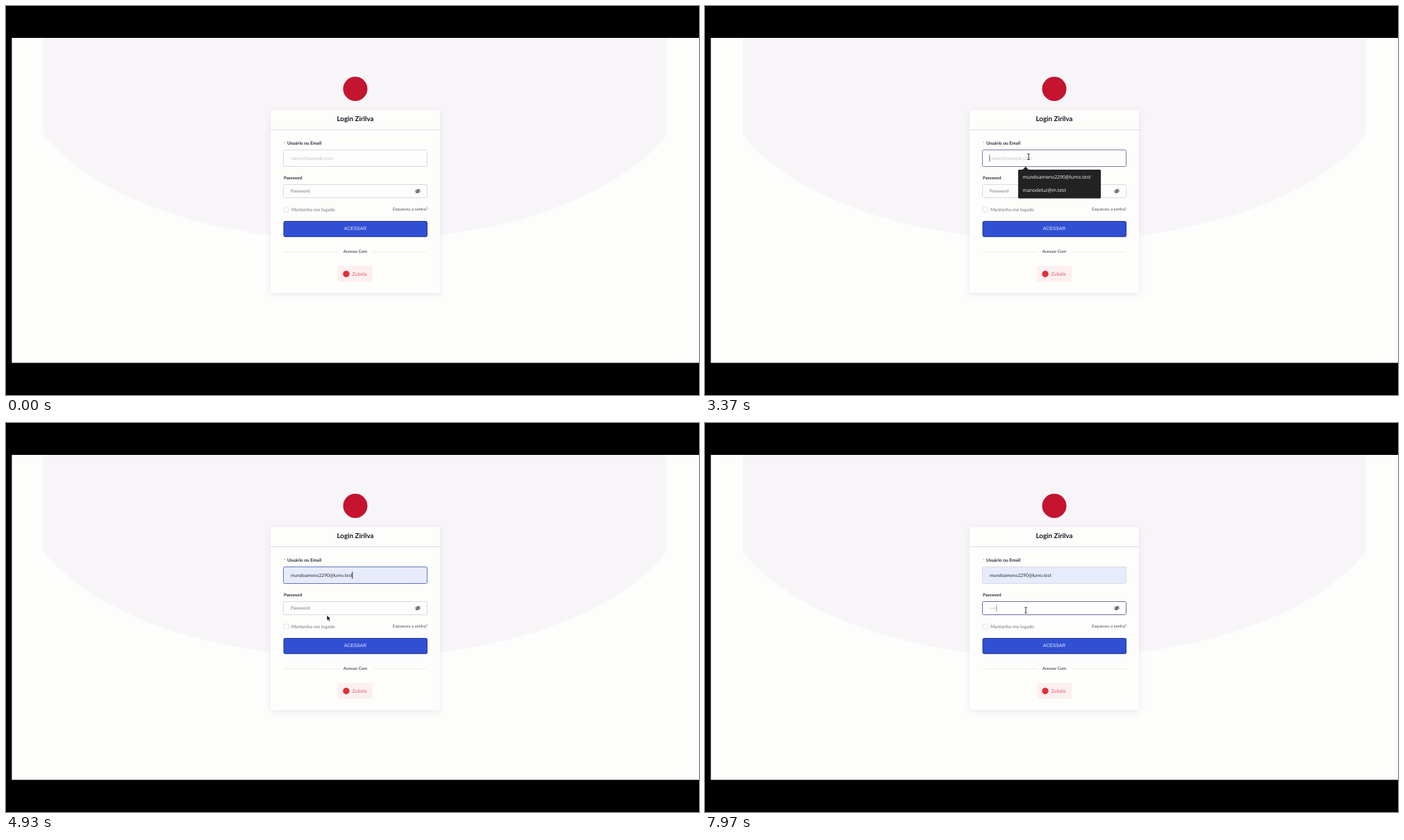
An HTML page for the animation above (8000 ms loop, 998 by 561 pixels).

```html
<!DOCTYPE html>
<html lang="pt">
<head>
<meta charset="utf-8">
<title>Login</title>
<style>
  html, body { margin: 0; width: 100%; height: 100%; overflow: hidden; background: #000; }
  svg { display: block; width: 100vw; height: 100vh; }
  text { font-family: Lato, sans-serif; text-rendering: geometricPrecision; fill: #2b2b38; }
  .bold { font-weight: 700; }
  .mid { text-anchor: middle; }
  .hint { fill: #77777f; }
  .arial { font-family: "Liberation Sans", Arial, sans-serif; }
  .noto { font-family: "Noto Sans", sans-serif; font-size: 6.85px; fill: #ececec; }
  .box { fill: #fdfdfd; stroke: #dadae0; }
  .card { filter: drop-shadow(0 2px 4px rgba(60, 50, 90, .1)); }
</style>
</head>
<body>
<svg viewBox="0 0 998 561">
  <rect width="998" height="561"/>
  <rect x="8.4" y="46" width="990" height="468.6" fill="#fdfdfb"/>
  <path d="M54 46H952V185A480 238 0 0 1 54 185Z" fill="#f8f5f9"/>
  <circle cx="503" cy="119.5" r="17.5" fill="#c4142f"/>

  <rect class="card" x="381" y="150" width="244" height="264" rx="1" fill="#fdfdfc"/>
  <path d="M381 178.5H625" stroke="#dcdce0"/>
  <text class="bold mid" x="503" y="166" font-size="9.8" style="fill:#15151f">Login Zirilva</text>

  <text x="400" y="200.3" font-size="6" style="fill:#c66">*</text>
  <text class="bold" x="405" y="200.2" font-size="6.6">Usuário ou Email</text>
  <rect id="email" class="box" x="399.5" y="207.5" width="207" height="24" rx="2"/>
  <text id="emailHint" x="410" y="222" font-size="6.75" style="fill:#c3c3cc">name@example.com</text>
  <text id="preview" class="arial" x="410" y="221.8" font-size="6.25">mundoameno2290@lumo.test</text>
  <text id="emailText" x="410" y="222" font-size="6.7">mundoameno2290@lumo.test</text>

  <text class="bold" x="400" y="249.8" font-size="6.2">Password</text>
  <rect id="pass" class="box" x="399.5" y="257.5" width="207" height="19" rx="2"/>
  <text id="passHint" class="hint" x="410" y="269.2" font-size="6.5">Password</text>
  <g id="dots" fill="#8a8a92"></g>
  <g fill="none" stroke="#3c3c46" stroke-width=".9">
    <path d="M589.3 267Q593 262.4 596.7 267Q593 271.6 589.3 267ZM590.2 270.2L595.8 263.8"/>
    <circle cx="593" cy="267" r="1.4"/>
  </g>
  <rect id="caret" width="1" height="10" fill="#22222c"/>

  <rect class="box" x="400" y="290" width="7" height="7" rx="1.2" stroke-width=".8"/>
  <text class="hint" x="411" y="295.7" font-size="6.7">Mantenha-me logado</text>
  <text x="557" y="295.2" font-size="6.1" style="fill:#50505c">Esqueceu a senha?</text>

  <rect x="400" y="311" width="207" height="22.6" rx="2" fill="#1b2a78" opacity=".35"/>
  <rect x="400" y="310.5" width="206.5" height="22" rx="2" fill="#304fd2" stroke="#2537a0"/>
  <text class="arial mid" x="503" y="323.4" font-size="6.75" style="fill:#f2f4ff">ACESSAR</text>

  <path d="M400 354.5H479M528 354.5H606" stroke="#f0f0d8"/>
  <text class="mid" x="503" y="356.2" font-size="6.1">Acessar Com</text>
  <rect x="478" y="375" width="50" height="23" rx="2" fill="#fdefef"/>
  <circle cx="490" cy="386.5" r="4.7" fill="#e0303c"/>
  <text x="498.5" y="388.8" font-size="7.1" style="fill:#dc5f70">Zubela</text>

  <g id="menu">
    <path d="M456.5 237L461.7 231.8L467 237Z" fill="#222"/>
    <rect x="451" y="236" width="119" height="41.5" rx="1.5" fill="#222"/>
    <rect id="hover" x="452" y="237" width="117" height="20" fill="#393939"/>
    <text class="noto" x="457.5" y="249">mundoameno2290@lumo.test</text>
    <text class="noto" x="457.5" y="268">manodeluz@m.test</text>
  </g>

  <g id="pointer">
    <path id="arrow" d="M0 0V8.2L2 6.4L3.4 9.4L4.8 8.8L3.5 5.9H6Z" fill="#111" stroke="#fff" stroke-width=".7"/>
    <path id="beam" d="M-1.7 -4H1.7M0 -4V4M-1.7 4H1.7" fill="none" stroke="#33333b"/>
  </g>
</svg>
<script>
const LOOP = 8000;
const $ = id => document.getElementById(id);
const between = (t, a, b) => t >= a && t < b;
const show = (id, on) => $(id).style.display = on ? "" : "none";
const ramp = (t, a, b) => {
  const k = Math.min(1, Math.max(0, (t - a) / (b - a)));
  return k * k * (3 - 2 * k);
};

// time, x, y of the pointer
const path = [
  [1100, 503, 70], [1430, 474.5, 199], [1850, 466, 217.5], [3400, 466, 217.5],
  [3900, 474, 248], [4470, 474, 248], [4900, 462, 277], [5270, 462, 281], [5650, 462, 270]
];
const keys = [6170, 6600, 7000, 7380, 7780];

for (let i = 0; i < keys.length; i++) {
  const dot = document.createElementNS("http://www.w3.org/2000/svg", "circle");
  dot.setAttribute("cx", 411 + 2 * i);
  dot.setAttribute("cy", 267);
  dot.setAttribute("r", .55);
  $("dots").append(dot);
}

function pointerAt(t) {
  let i = 0;
  while (i < path.length - 2 && t >= path[i + 1][0]) i++;
  const [t0, x0, y0] = path[i], [t1, x1, y1] = path[i + 1];
  const k = ramp(t, t0, t1);
  return [x0 + (x1 - x0) * k, y0 + (y1 - y0) * k];
}

function styleField(id, stroke, fill) {
  $(id).style.stroke = stroke || "";
  $(id).style.fill = fill;
}

function drawCaret(t) {
  const typed = keys.filter(k => t >= k).length;
  let x = 0, y = 214.5, alpha = 1;
  if (between(t, 2270, 2770) || between(t, 3370, 3700)) {
    x = 409.3;
    alpha = .6;
  } else if (between(t, 4270, 5720)) x = 498.3;
  else if (t >= 5720) {
    x = (typed ? 411.3 : 409.5) + 2 * Math.max(0, typed - 1);
    y = 262;
    alpha = typed === keys.length ? .45 : .9;
  }
  show("caret", x > 0);
  $("caret").setAttribute("x", x);
  $("caret").setAttribute("y", y);
  $("caret").style.opacity = alpha;
  [...$("dots").children].forEach((dot, i) => dot.style.opacity = i < typed ? 1 : 0);
  show("passHint", !typed);
}

function render(t) {
  const [x, y] = pointerAt(t);
  const filled = t >= 3700;
  const beam = between(t, 1370, 3600) || t >= 5480;
  show("pointer", t >= 1100);
  $("pointer").setAttribute("transform", `translate(${x} ${y})`);
  show("arrow", !beam);
  show("beam", beam);

  const emailFocus = between(t, 2170, 5720) && (filled ? "#6575bd" : "#7c80a8");
  const emailHover = between(t, 1600, 2170) && "#c2c2d0";
  styleField("email", emailFocus || emailHover, filled ? "#e7ebfb" : "#fdfdfd");
  styleField("pass", t >= 5720 && "#6c6ea0", "#fdfdfd");

  show("emailHint", !filled);
  show("preview", between(t, 3700, 4230));
  show("emailText", t >= 4230);

  const open = ramp(t, 2200, 2430);
  show("menu", between(t, 2200, 4230));
  $("menu").style.opacity = open;
  $("menu").setAttribute("transform", `translate(0 ${8 * (1 - open)})`);
  show("hover", filled);
  drawCaret(t);
}

const start = performance.now();
function tick() {
  render((performance.now() - start) % LOOP);
  requestAnimationFrame(tick);
}
tick();
</script>
</body>
</html>
```
